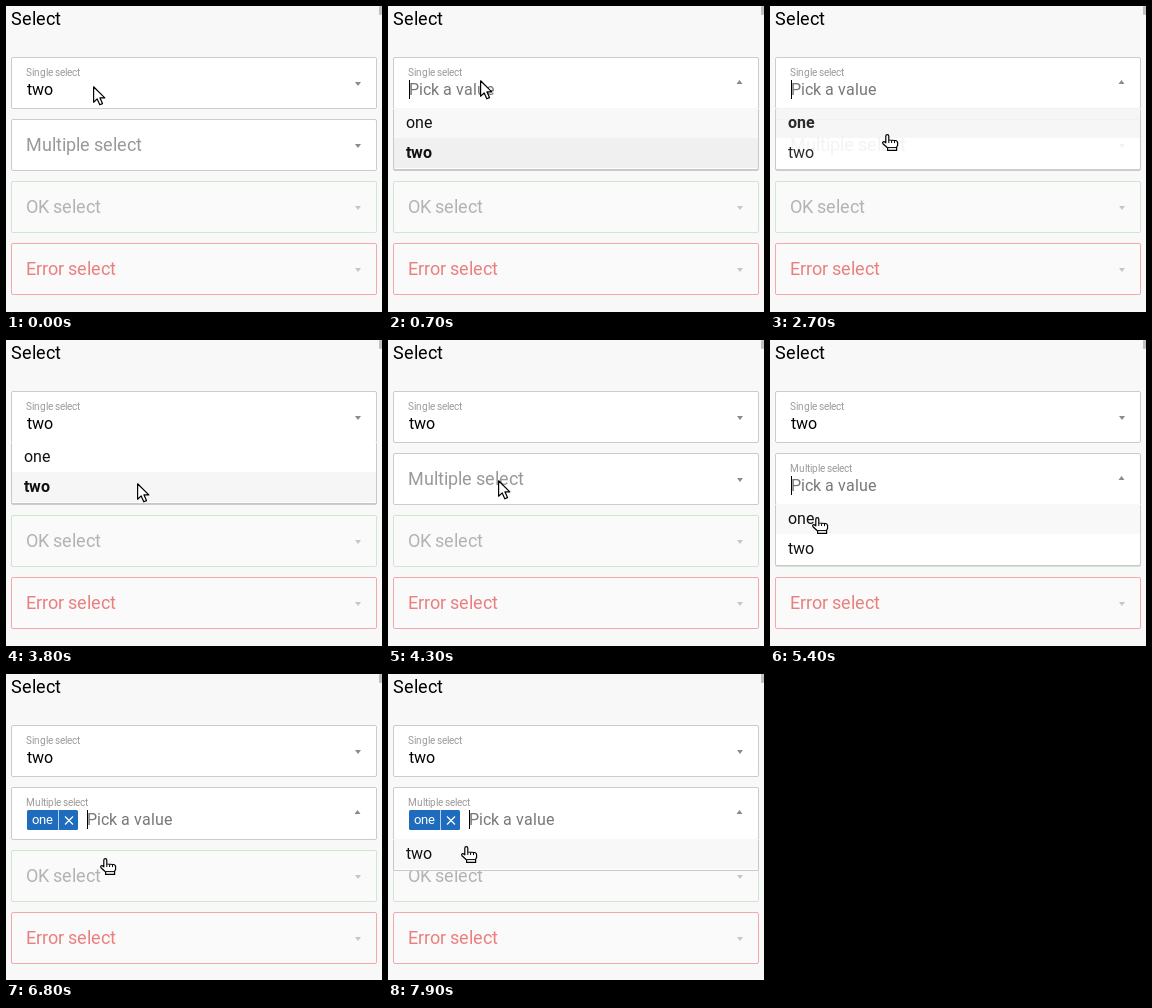
An HTML page that plays this animation: 376 by 306 pixels, repeating every 8000 ms.

```html
<!DOCTYPE html>
<html lang="en">
<head>
<meta charset="utf-8">
<title>Select</title>
<style>
  html, body { margin: 0; width: 100%; height: 100%; overflow: hidden; background: #f8f8f8; }
  svg { display: block; width: 376px; height: 306px; font-family: Roboto, sans-serif; }
</style>
</head>
<body>
<svg id="stage" viewBox="0 0 376 306"></svg>
<script>
const stage = document.getElementById('stage');
const pen = document.createElement('canvas').getContext('2d');
const LOOP = 8000, STEP = 100, FADE = 150;
const LEFT = 5, WIDTH = 366, PITCH = 62, ROW = 30;

// pointer strokes: start, end, x and y of the hotspot at the end
const HOME = [87, 80];
const MOVES = [
  [500, 700, 92, 74], [800, 1200, 79, 114], [1800, 2200, 74, 81], [2400, 3200, 131, 143],
  [4200, 4300, 110, 140], [4300, 4500, 97, 132], [4800, 5400, 47, 177],
  [5700, 6100, 96, 146], [6500, 6800, 99, 184], [6800, 7300, 61, 191], [7600, 7900, 78, 172]
];

// when each list opens and closes
const SINGLE = [[500, 1800], [2600, 3800]];
const MULTI = [[4700, 5600], [6800, LOOP]];
const TAGGED = 5600;

const easeOut = (p, power) => 1 - Math.pow(1 - Math.max(0, Math.min(1, p)), power);

function pointerAt(t) {
  let [x, y] = HOME;
  for (const [from, to, endX, endY] of MOVES) {
    const p = easeOut((t - from) / (to - from), 3);
    x += (endX - x) * p;
    y += (endY - y) * p;
  }
  return [Math.round(x), Math.round(y)];
}

function listState(spans, t) {
  const span = spans.filter(s => t >= s[0]).pop();
  if (!span) return { open: false, alpha: 0 };
  const open = t < span[1];
  const shown = easeOut((t - span[open ? 0 : 1]) / FADE, 2);
  return { open, alpha: open ? shown : 1 - shown };
}

// glyphs advance by whole pixels, like hinted screen text
function text(x, y, size, fill, str, weight = 400) {
  pen.font = `${weight} ${size}px Roboto, sans-serif`;
  const xs = [];
  for (const ch of str) {
    xs.push(x);
    x += Math.round(pen.measureText(ch).width);
  }
  return `<text x="${xs.join(' ')}" y="${y}" font-size="${size}" fill="${fill}" font-weight="${weight}">${str}</text>`;
}

const rect = (x, y, w, h, fill, extra = '') =>
  `<rect x="${x}" y="${y}" width="${w}" height="${h}" fill="${fill}" ${extra}/>`;
const frame = (y, h, fill, stroke) =>
  rect(LEFT + .5, y + .5, WIDTH - 1, h - 1, fill, `rx="1.5" stroke="${stroke}"`);
const chevron = (y, up, fill) =>
  `<path d="M${up ? 348.5 : 349} ${y + (up ? 27 : 25)}h6l-3 ${up ? -4 : 4}z" fill="${fill}"/>`;

function tag(y) {
  return rect(21, y + 23, 51, 20, '#1f6cbf', 'rx="1.5"') +
    text(26, y + 37, 13, '#fff', 'one') +
    rect(52, y + 23, 1, 20, '#b9d3ee') +
    `<path d="M59 ${y + 29.5}l8 8m0-8l-8 8" stroke="#fff" stroke-width="1.2"/>`;
}

function field(y, h, label, { open, value, tagged }) {
  let out = frame(y, h, '#fff', '#ccc') + chevron(y, open, '#8a8a8a');
  if (!open && !value && !tagged) return out + text(20, y + 32, 18, '#999', label);
  out += text(20, y + 19, 10, '#9c9a97', label);
  if (tagged) out += tag(y);
  const x = tagged ? 81 : 21;
  if (open) {
    out += text(x, y + 38, 16, '#777', 'Pick a value') + rect(x, y + 23, 1, 19, '#000');
  } else if (value) {
    out += text(x, y + 38, 16, '#000', value);
  }
  return out;
}

const disabled = (y, label, ink, border) =>
  frame(y, 52, '#fafafa', border) + text(20, y + 32, 18, ink, label) + chevron(y, false, '#c6c6c6');

function list(y, items, chosen, hover, alpha) {
  let out = frame(y, items.length * ROW + 2, '#fff', '#c8c8c8');
  out += rect(LEFT + 1, y, WIDTH - 2, 1, '#fff');
  items.forEach((name, i) => {
    const on = name === chosen, top = y + i * ROW;
    const fill = i !== hover ? (on ? '#f0f0f0' : '#fff') : (on ? '#f6f6f6' : '#f8f8f8');
    out += rect(LEFT + 1, top, WIDTH - 2, ROW, fill) +
      text(18, top + 20, 16, '#111', name, on ? 700 : 400);
  });
  return `<g opacity="${alpha}">${out}</g>`;
}

function pointer(x, y, hand) {
  const shape = hand
    ? '<path d="M-1.2 2.2Q-1.2.6.3.6T1.8 2.2V6L8.4 6.5Q10.6 6.8 10.6 9V11.4L9.6 13.2V16.4H.6V14L-4 9.8Q-4.9 7.9-3.2 7.5L-1.2 8.8Z"/>' +
      '<path d="M1.8 6v3M4.6 6.3v2.7M7.5 6.5v2.6M.8 13.6h8.6" fill="none" stroke-width="1"/>'
    : '<path d="M.6.8V16.2L4.2 12.9L6.8 18.8L9.5 17.6L7 11.9H11.8Z"/>';
  return `<g transform="translate(${x} ${y})" fill="#fff" stroke="#000" stroke-width="1.2" stroke-linejoin="round">${shape}</g>`;
}

function draw(t) {
  const [px, py] = pointerAt(t);
  const single = listState(SINGLE, t), multi = listState(MULTI, t);
  const value = t >= SINGLE[0][1] && t < SINGLE[1][1] ? 'one' : 'two';
  const tagged = t >= TAGGED, shift = tagged ? 1 : 0;
  const slot = i => 51 + PITCH * i;

  let out = rect(0, 0, 376, 306, '#f8f8f8') + rect(373, 0, 3, 9, '#c1c1c1', 'rx="1"');
  out += text(5, 19, 18, '#000', 'Select');
  out += field(slot(0), 52, 'Single select', { open: single.open, value });
  out += field(slot(1), 52 + shift, 'Multiple select', { open: multi.open, tagged });
  out += disabled(slot(2) + shift, 'OK select', '#b3b3b6', '#cfe6cf');
  out += disabled(slot(3) + shift, 'Error select', '#e98080', '#f3a9ab');

  let hand = false;
  const addList = (y, items, chosen, { open, alpha }) => {
    const row = Math.floor((py - y) / ROW);
    const inside = row >= 0 && row < items.length;
    if (open && inside) hand = true;
    if (alpha > 0) out += list(y, items, chosen, inside ? row : 0, alpha);
  };
  addList(slot(0) + 51, ['one', 'two'], value, single);
  addList(slot(1) + 51 + shift, tagged ? ['two'] : ['one', 'two'], '', multi);

  stage.innerHTML = out + pointer(px, py, hand);
}

const start = performance.now();
let last = -1;
function tick() {
  const t = Math.floor((performance.now() - start) % LOOP / STEP) * STEP;
  if (t !== last) draw(last = t);
  requestAnimationFrame(tick);
}
tick();
</script>
</body>
</html>
```
